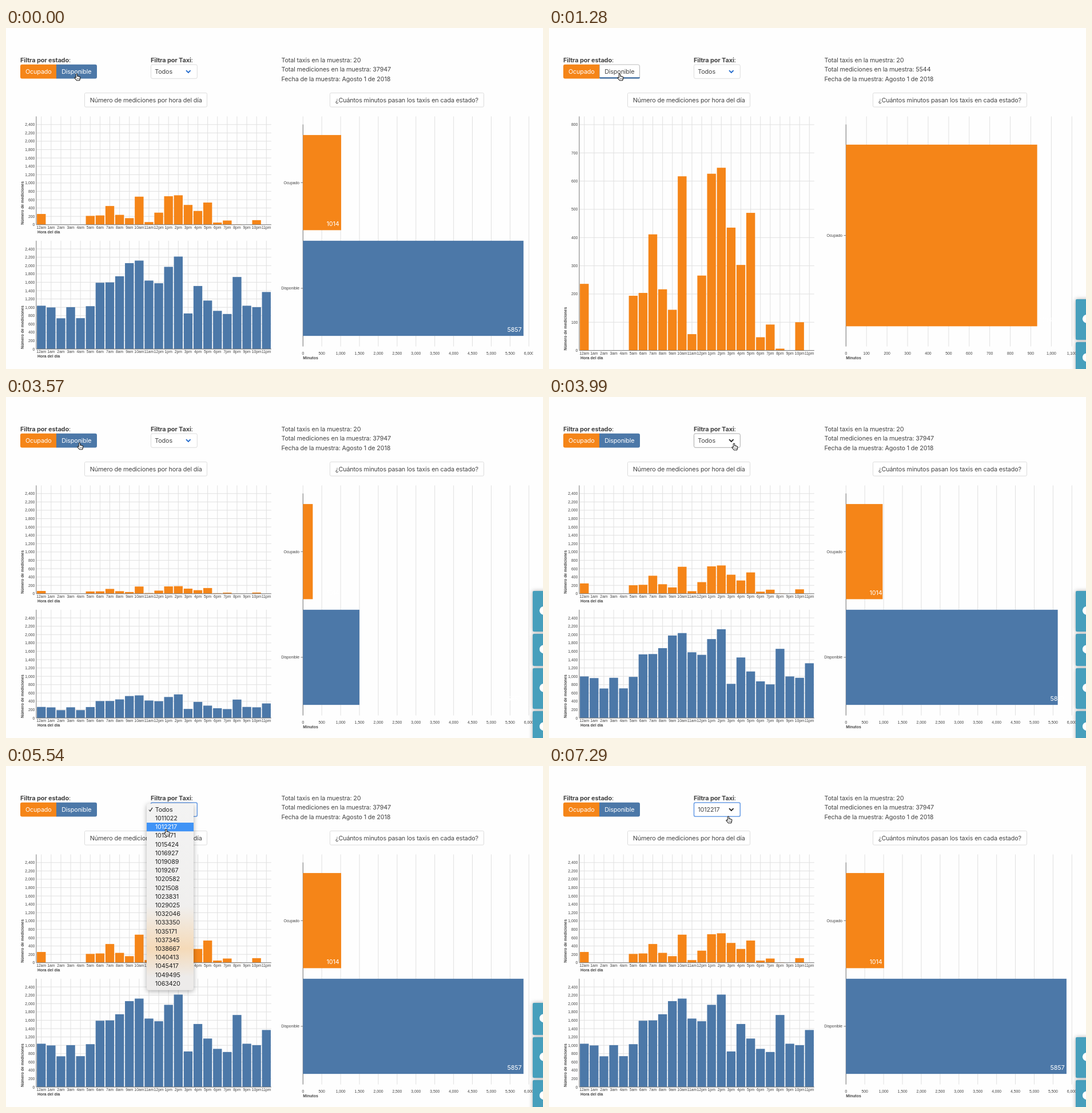
Recreate the animation shown at these times as an HTML page with a canvas. Size 939 by 596 pixels, loop 8 s.

```html
<!DOCTYPE html>
<html lang="es">
<head>
<meta charset="utf-8">
<title>Taxis</title>
<style>
html, body { margin: 0; width: 100%; height: 100%; overflow: hidden; background: #fefefe; }
canvas { display: block; }
</style>
</head>
<body>
<canvas id="stage" width="939" height="596"></canvas>
<script>
const ctx = document.getElementById('stage').getContext('2d');
const LOOP = 8000;
const ORANGE = '#f58518', BLUE = '#4c78a8', INK = '#444', GRID = '#e0e0e0', AXIS = '#777';
const UI = '10.8px Inter, Roboto, sans-serif';
const UI_BOLD = 'bold 11px Inter, Roboto, sans-serif';
const SMALL = '6.8px "Liberation Sans", Arial, sans-serif';
const SMALL_BOLD = 'bold 6.9px "Liberation Sans", Arial, sans-serif';

// Hourly counts
const HOURS = Array.from({ length: 24 }, (_, h) => (h % 12 || 12) + (h < 12 ? 'am' : 'pm'));
const BUSY = [257, 0, 0, 0, 0, 211, 222, 448, 236, 157, 672, 63,
  289, 682, 705, 474, 330, 531, 51, 100, 7, 0, 109, 0];
const FREE = [1038, 997, 737, 1004, 740, 1027, 1589, 1597, 1744, 2059, 2120, 1641,
  1577, 1970, 2216, 853, 1511, 1162, 915, 840, 1727, 1038, 1004, 1367];
const MINUTES = { Ocupado: 1014, Disponible: 5857 };
const TAXIS = ('Todos 1011022 1012217 1013171 1015424 1016927 1019089 1019267 1020582 1021508 1023831 ' +
  '1029025 1032046 1033350 1035171 1037345 1038667 1040413 1045417 1049495 1063420').split(' ');

// Moments of the session
const PRESS = 300, FILTER = 720, RELEASE = 2370, RESTORE = 3570, HOVER = 3990, OPEN = 5010, PICK = 6400;
const REFRESH = [0, PRESS, FILTER, 1010, 1280, 1610, RELEASE, RESTORE, 3720, HOVER, 4290, 4650, OPEN];
const RAPID = 5390, RAPID_STEP = 150;
// Pointer stops: time, x, y
const STOPS = [[3420, 123.5, 80], [3570, 128.5, 80], [3990, 323.5, 81], [5010, 316, 80],
  [5540, 280, 110.5], [6550, 282, 106], [7190, 313.5, 88]];

const clamp = v => Math.min(1, Math.max(0, v));
const easeCubic = p => (p = clamp(p)) < .5 ? 4 * p ** 3 : 1 - 4 * (1 - p) ** 3;

// The screen refreshes irregularly at first, then at a steady pace
function refreshed(t) {
  if (t >= RAPID) return t - (t - RAPID) % RAPID_STEP;
  return REFRESH.filter(r => r <= t).pop();
}

function growth(t) {
  if (t < FILTER) return 1;
  return t < RESTORE ? easeCubic((t - 568) / 980) : easeCubic((t - 3134) / 1090);
}

function pointerAt(t) {
  const next = STOPS.findIndex(s => s[0] > t);
  if (next < 1) return (next ? STOPS[STOPS.length - 1] : STOPS[0]).slice(1);
  const [t0, x0, y0] = STOPS[next - 1], [t1, x1, y1] = STOPS[next];
  const p = (t - t0) / (t1 - t0);
  return [x0 + (x1 - x0) * p, y0 + (y1 - y0) * p];
}

function text(s, x, y, font, color = INK, align = 'left') {
  ctx.font = font;
  ctx.letterSpacing = font === UI || font === UI_BOLD ? '-0.15px' : '0px';
  ctx.fillStyle = color;
  ctx.textAlign = align;
  ctx.fillText(s, x, y);
  return ctx.measureText(s).width;
}

const ui = (s, x, y, color, align) => text(s, x, y, UI, color, align);

function label(s, x, y) {
  ui(':', x + text(s, x, y, UI_BOLD), y);
}

function polyline(color, width, ...points) {
  ctx.strokeStyle = color;
  ctx.lineWidth = width;
  ctx.beginPath();
  points.forEach(([x, y]) => ctx.lineTo(x, y));
  ctx.stroke();
}

const line = (x0, y0, x1, y1, color) => polyline(color, 1, [x0, y0], [x1, y1]);

function box(x, y, w, h, r, fill, stroke, width = 1) {
  ctx.beginPath();
  ctx.roundRect(x, y, w, h, r);
  if (fill) { ctx.fillStyle = fill; ctx.fill(); }
  if (stroke) { ctx.strokeStyle = stroke; ctx.lineWidth = width; ctx.stroke(); }
}

function histogram(data, color, top, base, max, tick, grow) {
  const left = 53.2, step = 17.11, right = left + 24 * step;
  const k = (base - top) / max;
  const mid = i => left + (i + .5) * step;
  HOURS.forEach((_, i) => line(mid(i), top, mid(i), base, GRID));
  for (let v = 0; v <= max; v += tick) {
    const y = base - v * k;
    line(left, y, right, y, GRID);
    text(v.toLocaleString('en-US'), 50.3, y + 2.5, SMALL, INK, 'right');
  }
  ctx.fillStyle = color;
  data.forEach((v, i) => ctx.fillRect(mid(i) - 7.7, base - v * k * grow, 15.4, v * k * grow));
  line(52.9, top, 52.9, base, AXIS);
  line(left, base, right, base, AXIS);
  HOURS.forEach((h, i) => text(h, mid(i), base + 6.9, SMALL, INK, 'center'));
  text('Hora del día', 55, base + 14.9, SMALL_BOLD);
  ctx.save();
  ctx.translate(30.5, base);
  ctx.rotate(-Math.PI / 2);
  text('Número de mediciones', 0, 0, SMALL_BOLD);
  ctx.restore();
}

function totals(names, max, tick, grow) {
  const left = 519.3, top = 168.6, base = 556.6, k = 395 / max;
  const step = (base - top) / (names.length + .1), h = step * .9;
  ctx.save();
  ctx.beginPath();
  ctx.rect(470, 140, 451.5, 456);
  ctx.clip();
  for (let v = 0; v <= max; v += tick) {
    const x = left + v * k;
    line(x, 154.5, x, base, GRID);
    text(v.toLocaleString('en-US'), x, 570.5, SMALL, INK, 'center');
  }
  line(left, top, left, base, AXIS);
  names.forEach((name, i) => {
    const y = top + step * (i + .1), mid = y + h / 2, value = MINUTES[name];
    line(515.5, mid, left, mid, AXIS);
    text(name, 513, mid + 2.4, SMALL, INK, 'right');
    ctx.fillStyle = name === 'Ocupado' ? ORANGE : BLUE;
    ctx.fillRect(left, y, value * k * grow, h);
    ui(value, left + value * k - 3.5, y + h - 7, '#fff', 'right');
  });
  text('Minutos', left, 578.8, SMALL_BOLD);
  ctx.restore();
}

function header(t, both) {
  label('Filtra por estado', 25, 59.5);
  label('Filtra por Taxi', 253, 59.5);

  box(25, 63.7, 63.3, 24.8, [3, 0, 0, 3], ORANGE);
  ui('Ocupado', 56.8, 80, '#fff', 'center');
  const off = t >= PRESS && t < RELEASE;
  if (off) {
    box(88.5, 64, 70, 24, [0, 3, 3, 0], '#fff', '#bbb');
    box(88, 86, 71, 2.6, [0, 0, 3, 3], BLUE);
  } else {
    box(88, 63.7, 71, 24.8, [0, 3, 3, 0], BLUE);
  }
  ui('Disponible', 123.3, 80, off ? INK : '#fff', 'center');

  const hover = t >= HOVER, focus = t >= OPEN;
  box(253.5, 64, 80.8, 24.3, 2.5, '#fff', focus ? '#6c9fe6' : hover ? '#aaa' : '#dcdcdc', focus ? 1.6 : 1);
  ui(TAXIS[t >= PICK ? 2 : 0], 260.3, 80);
  polyline(hover ? '#222' : '#2069cc', 1.9, [315, 74.2], [318.8, 78], [322.6, 74.2]);

  ui('Total taxis en la muestra: 20', 481.5, 59.6);
  ui('Total mediciones en la muestra: ' + (both ? 37947 : 5544), 481.5, 76.1);
  ui('Fecha de la muestra: Agosto 1 de 2018', 481.5, 92.7);

  box(137.5, 113.5, 214, 24.5, 2, '#fff', '#dcdcdc');
  ui('Número de mediciones por hora del día', 244.7, 130, INK, 'center');
  box(566.5, 113.5, 269, 24.5, 2, '#fff', '#dcdcdc');
  ui('¿Cuántos minutos pasan los taxis en cada estado?', 701, 130, INK, 'center');
}

// Notices stack upwards, alternating one and two lines of text
function toasts(count) {
  for (let i = 0, y = 609; i < count; i++) {
    const h = i % 2 ? 71 : 56;
    y -= h + 4;
    ctx.save();
    ctx.shadowColor = 'rgba(120,120,120,.6)';
    ctx.shadowBlur = 7;
    box(921, y, 60, h, 2, '#479fbc');
    ctx.restore();
    ctx.fillStyle = '#fff';
    ctx.beginPath();
    ctx.arc(940.4, y + h / 2 - 1.2, 7.5, 0, Math.PI * 2);
    ctx.fill();
  }
}

function menu(alpha, pointerY) {
  const top = 68.3, row = 15.21;
  const active = Math.floor((pointerY - top) / row);
  const tint = ctx.createLinearGradient(0, 66, 0, 391);
  tint.addColorStop(0, '#f3f3f3');
  tint.addColorStop(.55, '#f0efee');
  tint.addColorStop(.78, '#f5dab8');
  tint.addColorStop(.93, '#edebea');
  ctx.save();
  ctx.globalAlpha = alpha;
  ctx.shadowColor = `rgba(0,0,0,${.32 * alpha})`;
  ctx.shadowBlur = 8;
  ctx.shadowOffsetY = 2;
  box(246, 65.8, 82, 326, 4, tint);
  ctx.shadowColor = 'transparent';
  TAXIS.forEach((id, i) => {
    const y = top + i * row, on = i === active;
    if (on) {
      ctx.fillStyle = '#4093f6';
      ctx.fillRect(246, y + .3, 82, row);
    }
    ui(id, 260.8, y + 11.4, on ? '#fff' : '#222');
  });
  polyline(active ? '#222' : '#fff', 1.2, [250, 76.5], [252, 79], [256, 72.8]);
  ctx.restore();
}

const HAND = new Path2D('M-1.2 1Q0-1 1.2 1V4.3Q2.3 3.4 3 4.7Q4.2 4 4.8 5.3Q6.3 4.8 6.4 6.5L6 9Q5.6 10.4 5 11.7H0Q-1.5 9.6-3.6 7.3Q-3.6 5.4-1.2 6.8Z');

function pointer(x, y) {
  ctx.save();
  ctx.translate(x, y);
  ctx.fillStyle = '#fff';
  ctx.fill(HAND);
  ctx.strokeStyle = '#222';
  ctx.lineWidth = 1.1;
  ctx.stroke(HAND);
  for (let i = 0; i < 3; i++) polyline('#222', .6, [1 + i * 1.75, 7.4], [1 + i * 1.75, 9.8]);
  ctx.restore();
}

function draw(now) {
  const t = refreshed(now % LOOP);
  const both = t < FILTER || t >= RESTORE, grow = growth(t);
  const [x, y] = pointerAt(t);
  ctx.fillStyle = '#fefefe';
  ctx.fillRect(0, 0, 939, 596);
  header(t, both);
  if (both) {
    histogram(BUSY, ORANGE, 154.5, 343.8, 2596, 200, grow);
    histogram(FREE, BLUE, 371.8, 561.1, 2596, 200, grow);
    totals(['Ocupado', 'Disponible'], 6000, 500, grow);
  } else {
    histogram(BUSY, ORANGE, 154.5, 563.6, 829.3, 100, grow);
    totals(['Ocupado'], 1100, 100, grow);
  }
  toasts(t < FILTER ? 0 : t < RESTORE ? 2 : t < RAPID ? 4 : t < 5840 ? 3 : 2);
  if (t >= OPEN) menu(clamp((6600 - t) / 600), y);
  pointer(x, y);
}

const start = performance.now();
function frame() {
  draw(performance.now() - start);
  requestAnimationFrame(frame);
}
frame();
</script>
</body>
</html>
```
